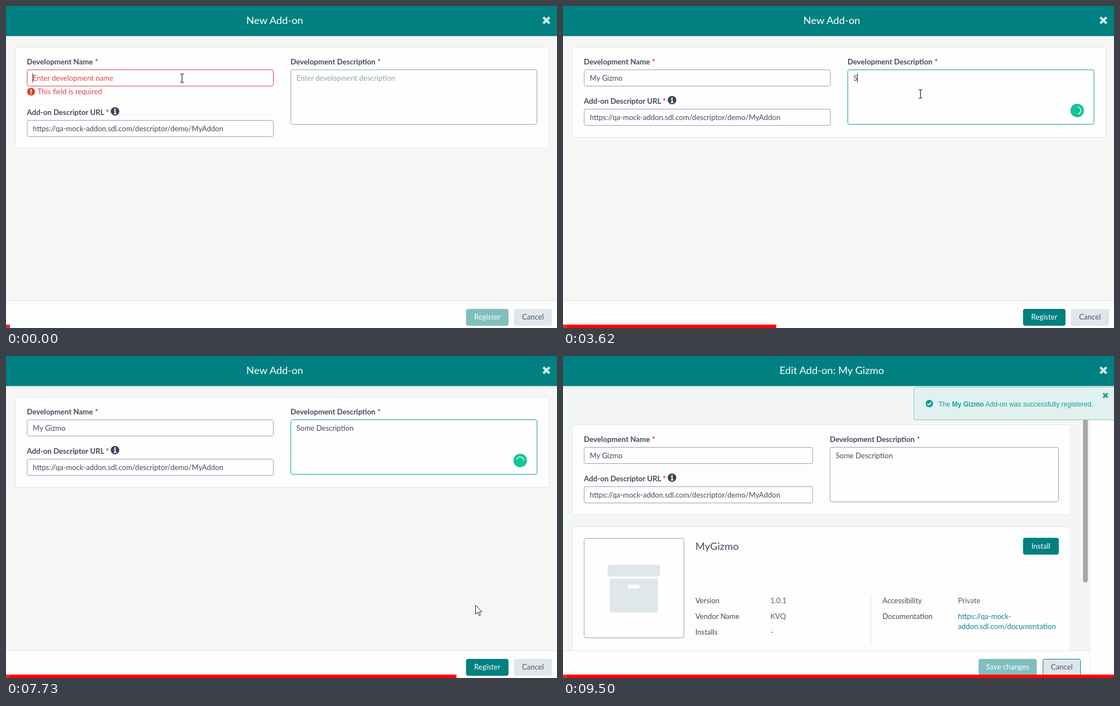
Animation, 978 px wide and 573 px high, one loop 9570 ms. Source, as an HTML page:

```html
<!DOCTYPE html>
<html lang="en">
<head>
<meta charset="utf-8">
<title>New Add-on</title>
<style>
  html, body { margin: 0; width: 100%; height: 100%; overflow: hidden; background: #f6f6f5; }
  svg { display: block; font: 13px Lato, Carlito, sans-serif; }
</style>
</head>
<body>
<svg id="stage" width="978" height="573" viewBox="0 0 978 573"></svg>
<script>
const LOOP = 9570, FRAMES = 137, GROUP = 14;
const GROUP_STARTS = [60, 1040, 2020, 2990, 3960, 4940, 5910, 6890, 7870, 8880, LOOP];
const TEAL = '#008080', FOCUS = '#0f9f94', INK = '#434b5d', LINE = '#93a2af', RED = '#d5484b';
const URL_TEXT = 'https://qa-mock-addon.sdl.com/descriptor/demo/MyAddon';

// Key press times, one per character
const NAME = { text: 'My Gizmo', keys: [760, 1040, 1200, 1400, 1560, 1690, 1850, 2020] };
const DESCRIPTION = {
  text: 'Some Description',
  keys: [3500, 3760, 3970, 4240, 4500, 4870, 5080, 5350, 5630, 5900, 6050, 6210, 6360, 6500, 6620, 6750]
};
const FOCUS_DESCRIPTION = 3060, BADGE = 3200, SUBMIT = 8300, DONE = 9220;
const POINTER = [
  [0, 312.5, 128.5], [2300, 312.5, 128.5], [2850, 634.5, 156.5], [7050, 634.5, 156.5],
  [7660, 833, 443], [7800, 833, 443], [8080, 850, 547], [8370, 850, 547], [8750, 883, 475]
];

const stage = document.getElementById('stage');
const ruler = document.createElement('canvas').getContext('2d');
ruler.font = '13px Lato, Carlito, sans-serif';

const rect = (x, y, w, h, fill, stroke = 'none', r = 0) =>
  `<rect x="${x}" y="${y}" width="${w}" height="${h}" rx="${r}" fill="${fill}" stroke="${stroke}"/>`;
const text = (x, y, s, fill = INK, more = '') => `<text x="${x}" y="${y}" fill="${fill}" ${more}>${s}</text>`;
const path = (d, stroke, width = 1, more = '') =>
  `<path d="${d}" fill="none" stroke="${stroke}" stroke-width="${width}" ${more}/>`;
const circle = (x, y, r, fill) => `<circle cx="${x}" cy="${y}" r="${r}" fill="${fill}"/>`;
const at = (x, y, body, angle = 0) => `<g transform="translate(${x} ${y}) rotate(${angle})">${body}</g>`;
const box = (x, y, w, h, stroke = LINE) => rect(x + .5, y + .5, w - 1, h - 1, '#fefefe', stroke, 3);
const panel = (x, y, w, h) => rect(x + .5, y + .5, w - 1, h - 1, '#fdfdfd', '#e4e8e9', 2);
const cross = (x, y, s, color, width) =>
  path(`M${x - s} ${y - s}L${x + s} ${y + s}M${x + s} ${y - s}L${x - s} ${y + s}`, color, width, 'stroke-linecap="square"');
const button = (x, y, w, label, fill, color = '#fff', stroke = fill) =>
  rect(x + .5, y + .5, w - 1, 29, fill, stroke, 3) +
  text(x + w / 2, y + 19, label, color, 'text-anchor="middle"');
const label = (x, y, s) =>
  text(x, y, `${s}<tspan dx="4" fill="#e0262b">*</tspan>`, INK, 'font-weight="700" font-size="13.2"');

// Point on a circle of radius r, as path coordinates
const polar = (r, deg) => `${r * Math.cos(deg * Math.PI / 180)} ${r * Math.sin(deg * Math.PI / 180)}`;
const arc = (r, half, color, width) =>
  path(`M${polar(r, -half)}A${r} ${r} 0 ${half > 90 ? 1 : 0} 1 ${polar(r, half)}`, color, width);

function frameAt(t) {
  if (t < GROUP_STARTS[0]) return { index: 0, time: 0 };
  const g = GROUP_STARTS.findIndex((s, i) => t >= s && t < GROUP_STARTS[i + 1]);
  const count = g === 9 ? 10 : GROUP;
  const step = (GROUP_STARTS[g + 1] - GROUP_STARTS[g]) / count;
  const k = Math.min(count - 1, Math.floor((t - GROUP_STARTS[g]) / step));
  return { index: 1 + GROUP * g + k, time: GROUP_STARTS[g] + k * step };
}

function pointerAt(t) {
  const i = POINTER.findIndex(p => p[0] > t);
  if (i < 0) return POINTER[POINTER.length - 1].slice(1);
  const [t0, x0, y0] = POINTER[i - 1], [t1, x1, y1] = POINTER[i];
  const p = (t - t0) / (t1 - t0), e = p * p * (3 - 2 * p);
  return [x0 + (x1 - x0) * e, y0 + (y1 - y0) * e];
}

const typed = (entry, t) => entry.text.slice(0, entry.keys.filter(k => k <= t).length);

function caret(entry, x, t, since) {
  const last = Math.max(since, ...entry.keys.filter(k => k <= t));
  if ((t - last) % 1060 >= 530) return '';
  const cx = Math.round(x + ruler.measureText(typed(entry, t)).width) + .5;
  return path(`M${cx} 120V136`, '#222');
}

function infoIcon(x, y) {
  return at(x, y, circle(0, 0, 7.6, '#3a4155') + circle(0, -3.6, 1.4, '#fff') +
    path('M-2 -.8H.3V4M-2.4 4H2.6', '#fff', 1.8));
}

function errorRow() {
  return circle(44.5, 152.5, 7, '#da432e') + path('M44.5 148V153.5M44.5 155V157', '#fff', 2) +
    text(56, 156.5, 'This field is required', RED);
}

function form(t, width, dy) {
  const name = typed(NAME, t), description = typed(DESCRIPTION, t);
  const error = !name, fieldWidth = (width - 72) / 2, right = 67 + fieldWidth;
  const onName = t < FOCUS_DESCRIPTION, onDescription = !onName && t < SUBMIT;
  const shift = error ? 20 : 0;
  return at(0, dy,
    panel(16, 73, width, 161 + (error ? 19 : 0)) +
    label(37, 104, 'Development Name') +
    box(37, 113, fieldWidth, 30, error ? RED : onName ? FOCUS : LINE) +
    text(47.5, 132.5, name || 'Enter development name', error ? RED : INK) +
    (error ? errorRow() : '') +
    label(37, 174 + shift, 'Add-on Descriptor URL') + infoIcon(193.5, 167.5 + shift) +
    box(37, 183 + shift, fieldWidth, 30) + text(47.5, 202.5 + shift, URL_TEXT) +
    label(right, 104, 'Development Description') +
    box(right, 113, fieldWidth, 98, onDescription ? FOCUS : LINE) +
    text(right + 10.5, 132.5, description || 'Enter development description', description ? INK : '#8fa6ad') +
    (onName ? caret(NAME, 47, t, 0) : onDescription ? caret(DESCRIPTION, 515, t, FOCUS_DESCRIPTION) : ''));
}

const header = title => rect(0, 0, 978, 53.5, TEAL) +
  text(477, 32, title, '#fff', 'text-anchor="middle" font-size="18.2"') + cross(959.2, 25.5, 4, '#d3e9e9', 4.2);
const footer = width => rect(0, 524, width, 49, '#fdfdfd') + path(`M0 524.5H${width}`, '#e2e7e9');
const sideStrip = () => rect(935, 54, 43, 519, '#fefefe') + path('M935.5 54V573', '#e9ebec');

function editing(t) {
  const ready = typed(DESCRIPTION, t) !== '';
  const badge = t < BADGE ? '' : at(912.7, 186, circle(0, 0, 12, '#15c39a') +
    arc(6.3, 80, '#e4fff7', 1.7), (t - 3620) / 713 * 360);
  return header('New Add-on') + form(t, 948, 0) + badge + footer(978) +
    button(816.5, 539, 75.5, 'Register', ready ? TEAL : '#80bfbe') +
    button(901.5, 539, 67.5, 'Cancel', '#e1e6ea', '#4b5466');
}

function loading(t) {
  const bubble = path('M952.5 99.5C954 98 954.6 97 954.5 95.6C951.5 94.2 949.8 92.4 949.8 90' +
    'C949.8 86 954 83.5 959.3 83.5S968.8 86 968.8 90S964.5 96.8 959.3 96.8C957 98.4 955 99.4 952.5 99.5Z', '#7f8a99', 1.3);
  return header('') + form(t, 898, 0) + footer(935) +
    button(851.5, 539, 67.5, 'Cancel', '#dfe6ea', '#4b5466', TEAL) +
    rect(0, 54, 935, 519, 'rgba(255,255,255,.45)') + sideStrip() + bubble +
    at(489.7, 318, arc(15, 135, TEAL, 1.7), (t - 8880) / 1000 * 360) +
    rect(-3, 562.5, 326, 12, '#dce1e4', 'none', 3);
}

function details() {
  const rows = [
    [235, 368, 440, 'Version', '1.0.1'], [235, 368, 468, 'Vendor Name', 'KVQ'], [235, 368, 496, 'Installs', '-'],
    [567, 701, 440, 'Accessibility', 'Private'], [567, 701, 468, 'Documentation', '']
  ];
  return panel(16, 303, 885, 240) + box(37, 324, 178, 178) +
    rect(79, 371.5, 93, 21, '#dfe7ea', 'none', 3) + rect(83, 396, 85.5, 60.5, '#dfe7ea', 'none', 3) +
    rect(115, 407, 21, 6.8, '#fff', 'none', 3.4) +
    text(235, 345, 'MyGizmo', INK, 'font-size="18.2"') + button(816.5, 323.5, 63.5, 'Install', TEAL) +
    rows.map(([x, vx, y, key, value]) => text(x, y, key) + text(vx, y, value, '#596273')).join('') +
    path('M546.5 428V511', '#dfe4e7') +
    text(701, 468, 'https://qa-mock-', '#0f83a0') + text(701, 486, 'addon.sdl.com/documentation', '#0f83a0');
}

function toast() {
  return rect(622.5, 55.5, 360, 58, '#e1f1f0', '#8ac7c4', 3) + circle(650.3, 84.7, 6.6, '#0d9c92') +
    path('M647 84.7L649.5 87.2L653.8 82.7', '#fff', 1.9) +
    text(666.5, 90, 'The <tspan font-weight="700">My Gizmo</tspan> Add-on was successfully registered.', '#149f94',
      'font-family="Liberation Sans, Arial, sans-serif" font-size="12"') + cross(962.8, 70.3, 3, '#149f94', 2.8);
}

function registered(t) {
  return rect(0, 53, 935, 471, '#f4f6f6') + header('Edit Add-on: My Gizmo') + form(t, 885, 49) + details() +
    rect(923, 60, 8.5, 343, '#a4a6a9', 'none', 4) + footer(935) + sideStrip() +
    button(737.5, 539, 103.5, 'Save changes', '#80bfbe') +
    button(851.5, 539, 67.5, 'Cancel', '#dfe6ea', '#4b5466', TEAL) + toast();
}

function pointer(t) {
  const [x, y] = pointerAt(t);
  if (y < 211) return at(x, y, path('M-3.5 -7.5H-1L0 -6.5L1 -7.5H3.5M0 -6.5V6.5M-3.5 7.5H-1L0 6.5L1 7.5H3.5', '#222', 1.2));
  return at(x, y, '<path d="M.5 .5V16.5L4.2 13L6.8 19L9.3 18L6.7 12.2H11.8Z" fill="#fff" stroke="#222"/>');
}

function draw({ index, time }) {
  const scene = time < SUBMIT ? editing : time < DONE ? loading : registered;
  stage.innerHTML = rect(0, 0, 978, 573, '#f6f6f5') + scene(time) + (time < DONE ? pointer(time) : '') +
    rect(0, 567, (index + 1) * 978 / FRAMES, 6, '#f00') + rect(0, 567, 7, 6, '#e52b22');
}

let shown = -1;
const began = performance.now();
function tick() {
  const frame = frameAt((performance.now() - began) % LOOP);
  if (frame.index !== shown) {
    shown = frame.index;
    draw(frame);
  }
  requestAnimationFrame(tick);
}
tick();
</script>
</body>
</html>
```
